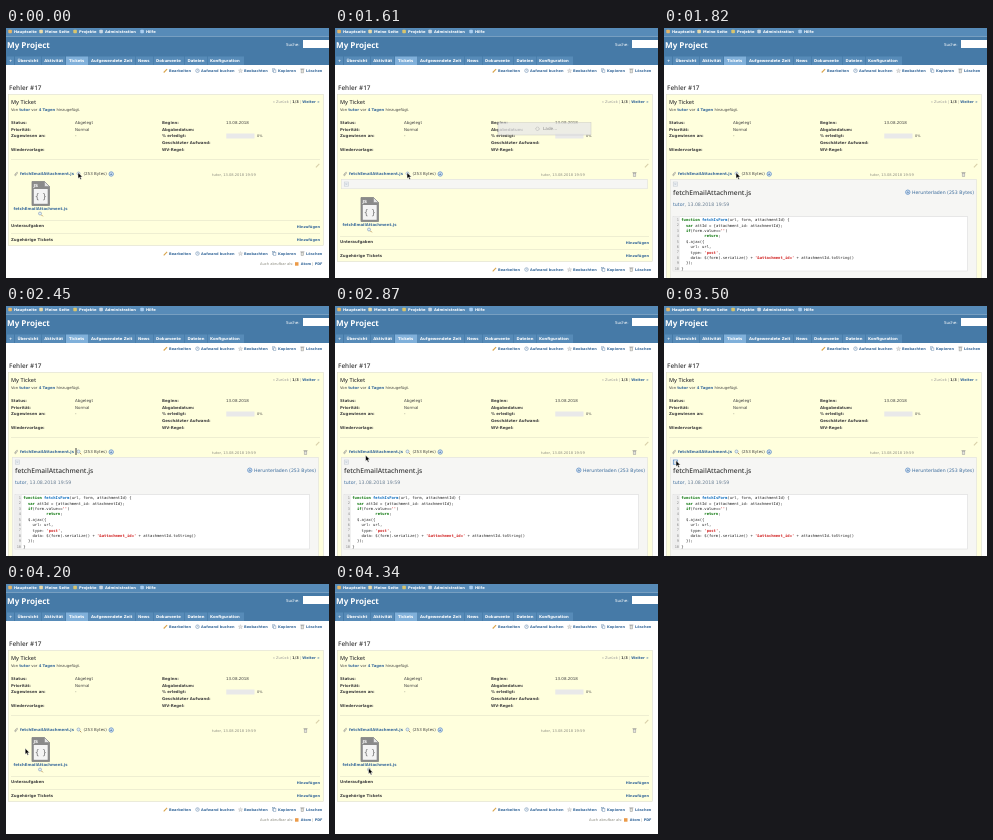
An HTML page for the animation above (4.41 s loop, 323 px wide and 250 px high).

```html
<!DOCTYPE html>
<html lang="de">
<head>
<meta charset="utf-8">
<title>Fehler #17</title>
<style>
  html, body { margin: 0; width: 100%; height: 100%; overflow: hidden; background: #fff; }
  svg { display: block; width: 100%; height: 100%; }
  text { font-family: "DejaVu Sans", sans-serif; white-space: pre; text-rendering: geometricPrecision; }
  .title { font-family: "Open Sans", sans-serif; font-weight: 600; }
  .code { font-family: "DejaVu Sans Mono", monospace; }
  .bold { font-weight: 700; }
</style>
</head>
<body>
<svg id="stage" viewBox="0 0 323 250" preserveAspectRatio="none"></svg>
<script>
const LOOP = 4410, STEP = 70;
const BLUE = '#3a6b9c', INK = '#404040', GREY = '#8c8c80', YELLOW = '#ffffdd';
const stage = document.getElementById('stage');

function add(parent, tag, attrs = {}) {
  const node = document.createElementNS('http://www.w3.org/2000/svg', tag);
  for (const key in attrs) node.setAttribute(key, attrs[key]);
  return parent.appendChild(node);
}
const group = (parent = stage) => add(parent, 'g');
const rect = (g, x, y, width, height, fill, extra) => add(g, 'rect', { x, y, width, height, fill, ...extra });
const path = (g, d, stroke, width = 0.7, fill = 'none') =>
  add(g, 'path', { d, stroke, fill, 'stroke-width': width });
const line = (g, x1, y, x2, stroke = '#dcdcc4') => path(g, `M${x1} ${y}H${x2}`, stroke, 0.5);

// Text is placed by its vertical middle; an array holds [string, colour, weight] runs.
function text(g, x, y, content, size = 3.9, fill = INK, cls = '', anchor = 'start') {
  const node = add(g, 'text', { x, y: y + size * 0.35, 'font-size': size, fill, class: cls, 'text-anchor': anchor });
  if (typeof content === 'string') node.textContent = content;
  else for (const [run, colour, weight = 400] of content)
    add(node, 'tspan', { fill: colour, 'font-weight': weight }).textContent = run;
  return node;
}
const bold = (g, x, y, s, size = 3.9, fill = INK, anchor) => text(g, x, y, s, size, fill, 'bold', anchor);

// Small icons
function magnifier(g, x, y) {
  path(g, `M${x + 0.7} ${y + 0.7}l1.6 1.6`, '#b08a50', 0.9);
  add(g, 'circle', { cx: x - 0.5, cy: y - 0.5, r: 1.5, fill: '#e3eef8', stroke: '#7d98b5', 'stroke-width': 0.6 });
}
function download(g, x, y) {
  add(g, 'circle', { cx: x, cy: y, r: 2.2, fill: '#e6effa', stroke: '#5f8fc4', 'stroke-width': 0.8 });
  path(g, `M${x} ${y - 1.2}v2.2m-1-1l1 1l1-1`, '#3f70a0', 0.6);
}
function pencil(g, x, y, colour = '#d9a44a') {
  path(g, `M${x - 1.8} ${y + 1.8}L${x + 1.6} ${y - 1.6}`, colour, 1.1);
}
function trash(g, x, y) {
  rect(g, x - 1.3, y - 1.1, 2.6, 3.3, '#e4e4dc', { stroke: '#999', 'stroke-width': 0.5 });
  path(g, `M${x - 2} ${y - 1.7}h4`, '#888', 0.6);
}

function actions(g, y) {
  pencil(g, 159.5, y);
  add(g, 'circle', { cx: 191.5, cy: y, r: 1.8, fill: '#f4f8fc', stroke: '#7795b5', 'stroke-width': 0.6 });
  path(g, `M191.5 ${y - 1.2}v1.2h1`, '#7795b5', 0.4);
  path(g, `M234.5 ${y - 2}l.6 1.4 1.5.1-1.1 1 .4 1.5-1.4-.8-1.4.8.4-1.5-1.1-1 1.5-.1z`, '#b5b5b5', 0.4, '#e5e5e5');
  for (const d of [0, 1.1]) rect(g, 266.4 + d, y - 1.9 + d, 2.4, 2.8, '#fff', { stroke: '#7795b5', 'stroke-width': 0.5 });
  trash(g, 296.4, y);
  [[163, 'Bearbeiten'], [195, 'Aufwand buchen'], [238, 'Beobachten'], [272, 'Kopieren'], [300, 'Löschen']]
    .forEach(([x, label]) => bold(g, x, y, label, 3.55, BLUE));
}

function header() {
  const g = group();
  rect(g, 0, 0, 323, 8.5, '#578bb8');
  rect(g, 0, 8.5, 323, 28.5, '#467aa7');
  [['Hauptseite', 8, '#e6b565'], ['Meine Seite', 39, '#e8d9a8'], ['Projekte', 73, '#d8c46c'],
   ['Administration', 99, '#c9d6e2'], ['Hilfe', 140, '#a9cdf0']].forEach(([label, x, colour]) => {
    rect(g, x - 5.7, 1.7, 3.6, 3.6, colour, { rx: 0.8 });
    bold(g, x, 3.6, label, 3.7, '#fff');
  });
  text(g, 1, 17.5, 'My Project', 8.1, '#fff', 'title bold');
  text(g, 280, 16.1, 'Suche:', 4, '#fff');
  rect(g, 297, 12, 26, 8, '#fff');
  [['+', 1, 8, 3], ['Übersicht', 9, 35.3, 11.5], ['Aktivität', 36, 59.3, 38.3], ['Tickets', 60, 82.3, 63],
   ['Aufgewendete Zeit', 83, 129.3, 85], ['News', 130, 147.3, 132], ['Dokumente', 148, 178.3, 150],
   ['Dateien', 179, 201.3, 181.5], ['Konfiguration', 202, 238, 204]].forEach(([label, left, right, x]) => {
    rect(g, left, 28.5, right - left, 8.5, label === 'Tickets' ? '#80b0da' : '#578bb8');
    bold(g, x, 33.1, label, 3.85, '#fff');
  });
  actions(g, 42.7);
  text(g, 3, 59.7, 'Fehler #17', 6.4, INK, 'title');
}

function details() {
  const g = group();
  text(g, 5, 74.2, 'My Ticket', 5.5, INK, 'title');
  text(g, 313.5, 74, [['« Zurück | ', '#999'], ['1/3', INK, 700], [' | ', '#999'], ['Weiter »', BLUE, 700]], 3.65, INK, '', 'end');
  text(g, 5, 82, [['Von ', INK], ['tutor', BLUE, 700], [' vor ', INK], ['4 Tagen', BLUE, 700], [' hinzugefügt.', INK]], 3.8);
  [['Status:', 'Abgelegt', 'Beginn:', '13.08.2018'], ['Priorität:', 'Normal', 'Abgabedatum:', ''],
   ['Zugewiesen an:', '-', '% erledigt:', ''], ['', '', 'Geschätzter Aufwand:', ''],
   ['Wiedervorlage:', '', 'WV-Regel:', '']].forEach(([a, b, c, d], row) => {
    const y = 94.5 + row * 6.75;
    bold(g, 5, y, a);
    text(g, 69, y, b, 4);
    bold(g, 156, y, c);
    text(g, 220, y, d, 4);
  });
  rect(g, 220.3, 105.5, 28.2, 5, '#e9e9e9');
  text(g, 251, 107.8, '0%', 3.4);
  line(g, 5, 131.5, 314);
  pencil(g, 311.7, 137.5, '#d8cfa8');
  path(g, 'M8.5 147l2-2.6q1.3-.8 1 .8l-1.8 2.5q-1 .6-.7-.6l1.4-2', '#888', 0.5);
  bold(g, 14, 146, 'fetchEmailAttachment.js', 3.88, BLUE);
  magnifier(g, 73, 146);
  text(g, 77.5, 146, '(253 Bytes)', 4);
  download(g, 105.2, 146);
  text(g, 206, 146.5, 'tutor, 13.08.2018 19:59', 3.65, GREY);
}

function lowerPart() {
  const g = group();
  path(g, 'M26 153.5h12.5l5 5v19h-17.5z', '#858585', 0.8, '#8a8a8a');
  path(g, 'M38.5 153.5v5h5z', '#858585', 0.5, '#e4e4e4');
  bold(g, 27.5, 157.2, 'JS', 4.2, '#fff');
  rect(g, 27.8, 161, 13.9, 14.8, '#f4f4f4');
  text(g, 34.8, 168, '{ }', 7.6, '#666', '', 'middle');
  bold(g, 34.5, 181, 'fetchEmailAttachment.js', 3.88, BLUE, 'middle');
  magnifier(g, 34.5, 186);
  line(g, 5, 192.5, 314);
  bold(g, 5, 198, 'Unteraufgaben');
  bold(g, 314, 199.2, 'Hinzufügen', 3.6, BLUE, 'end');
  line(g, 5, 205.5, 314);
  bold(g, 5, 211.7, 'Zugehörige Tickets');
  bold(g, 314, 212, 'Hinzufügen', 3.6, BLUE, 'end');
  actions(g, 225.5);
  text(g, 287.5, 236, 'Auch abrufbar als:', 3.65, GREY, '', 'end');
  rect(g, 289, 234.2, 3.5, 3.5, '#eb9a48');
  text(g, 316.5, 236, [['Atom', BLUE, 700], [' | ', GREY], ['PDF', BLUE, 700]], 3.5, BLUE, '', 'end');
  return g;
}

function preview() {
  const g = group();
  text(g, 9, 164.3, 'fetchEmailAttachment.js', 6.6, INK, 'title');
  download(g, 243.8, 164.2);
  text(g, 248, 164.2, 'Herunterladen (253 Bytes)', 4.65, BLUE);
  text(g, 9, 176.4, [['tutor', BLUE], [', 13.08.2018 19:59', '#6a7f94']], 4.7);
  rect(g, 9, 188.5, 294.5, 54.5, '#fff', { stroke: '#d5d5d5', 'stroke-width': 0.5 });
  rect(g, 9.2, 188.7, 6.6, 54.1, '#eee');
  const key = '#007000', str = '#d02020', dark = '#222';
  [[['function', key, 700], [' ', dark], ['fetchIsForm', '#0066bb', 700], ['(url, form, attachmentId) {', dark]],
   [['  var', key, 700], [' attId = {attachment_id: attachmentId};', dark]],
   [['  if', key, 700], ['(form.value==', dark], ["''", str, 700], [')', dark]],
   [['          return', key, 700], [';', dark]],
   [['  $.ajax({', dark]],
   [['    url: url,', dark]],
   [['    type: ', dark], ["'post'", str, 700], [',', dark]],
   [['    data: $(form).serialize() + ', dark], ["'&attachment_id='", str, 700], [' + attachmentId.toString()', dark]],
   [['  });', dark]],
   [['}', dark]]].forEach((runs, i) => {
    const y = 191.8 + i * 5.4;
    text(g, 15, y, String(i + 1), 3.6, '#888', 'code', 'end');
    text(g, 17.3, y, runs, 3.83, dark, 'code');
  });
  return g;
}

rect(stage, 0, 0, 323, 250, '#fff');
const box = rect(stage, 2.3, 66.5, 315, 151, YELLOW, { stroke: '#d7d7c8', 'stroke-width': 0.5 });
header();
details();
const lower = lowerPart();
const panel = rect(stage, 6.3, 151.3, 306.2, 10, '#f6f6f4', { stroke: '#dcdcd8', 'stroke-width': 0.5 });
const closeIcon = group();
const closeFrame = rect(closeIcon, 9.3, 154, 4.2, 4.2, '#f0f4f8', { 'stroke-width': 0.7 });
path(closeIcon, 'M10.4 155.1l2 2m0-2l-2 2', '#aab4be', 0.5);
const content = preview();
const bin = group();
trash(bin, 299.5, 146.3);
const loading = group();
rect(loading, 163, 94.5, 93, 12.5, '#e8e8e8', { opacity: 0.75, stroke: '#bbb', 'stroke-width': 0.5 });
add(loading, 'circle', { cx: 202.5, cy: 100.8, r: 1.7, fill: 'none', stroke: '#aaa', 'stroke-width': 0.7, 'stroke-dasharray': '1 .5' });
text(loading, 208, 100.8, 'Lade...', 4.2, '#888');
const cursor = group();
const arrow = path(cursor, 'M0 0v6l1.4-1.2 1 2.2 1.1-.5-1-2.1h1.9z', '#fff', 0.5, '#000');
const beam = path(cursor, 'M-1-2q1 0 1 .8v4.4q0 .8-1 .8M1-2q-1 0-1 .8v4.4q0 .8 1 .8', '#444', 0.6);

// Cursor path: [ms, x, y]
const route = [[0, 72, 144.5], [2380, 72, 144.5], [2450, 70, 144.5], [2940, 24, 150],
               [3290, 12, 154.5], [4130, 12, 154.5], [4340, 33.5, 184], [LOOP, 33.5, 184]];
function cursorAt(time) {
  const i = route.findIndex(([ms]) => ms > time);
  const [t0, x0, y0] = route[i - 1], [t1, x1, y1] = route[i];
  const k = (time - t0) / (t1 - t0);
  return [x0 + (x1 - x0) * k, y0 + (y1 - y0) * k];
}
// Height the opened attachment panel adds to the page
function panelGrowth(time) {
  if (time < 1610 || time >= 3570) return 0;
  return time < 1750 ? 16 : time < 1820 ? 24 : 200;
}
const show = (node, visible) => node.setAttribute('visibility', visible ? 'visible' : 'hidden');

function draw(now) {
  const time = Math.floor((now % LOOP) / STEP) * STEP;
  const growth = panelGrowth(time);
  box.setAttribute('height', 151 + growth);
  lower.setAttribute('transform', `translate(0 ${growth})`);
  panel.setAttribute('height', Math.max(0, growth - 6.5));
  closeFrame.setAttribute('stroke', time === 3500 ? '#4a82c0' : '#ccd2d8');
  show(panel, growth);
  show(closeIcon, growth);
  show(content, growth === 200);
  show(bin, time >= 1610);
  show(loading, time >= 1610 && time < 1750);
  const [x, y] = cursorAt(time);
  const overText = x > 14 && x < 71 && y < 148;
  cursor.setAttribute('transform', `translate(${x} ${y})`);
  show(arrow, !overText);
  show(beam, overText);
}

let start;
function tick(now) {
  start ??= now;
  draw(now - start);
  requestAnimationFrame(tick);
}
draw(0);
requestAnimationFrame(tick);
</script>
</body>
</html>
```
